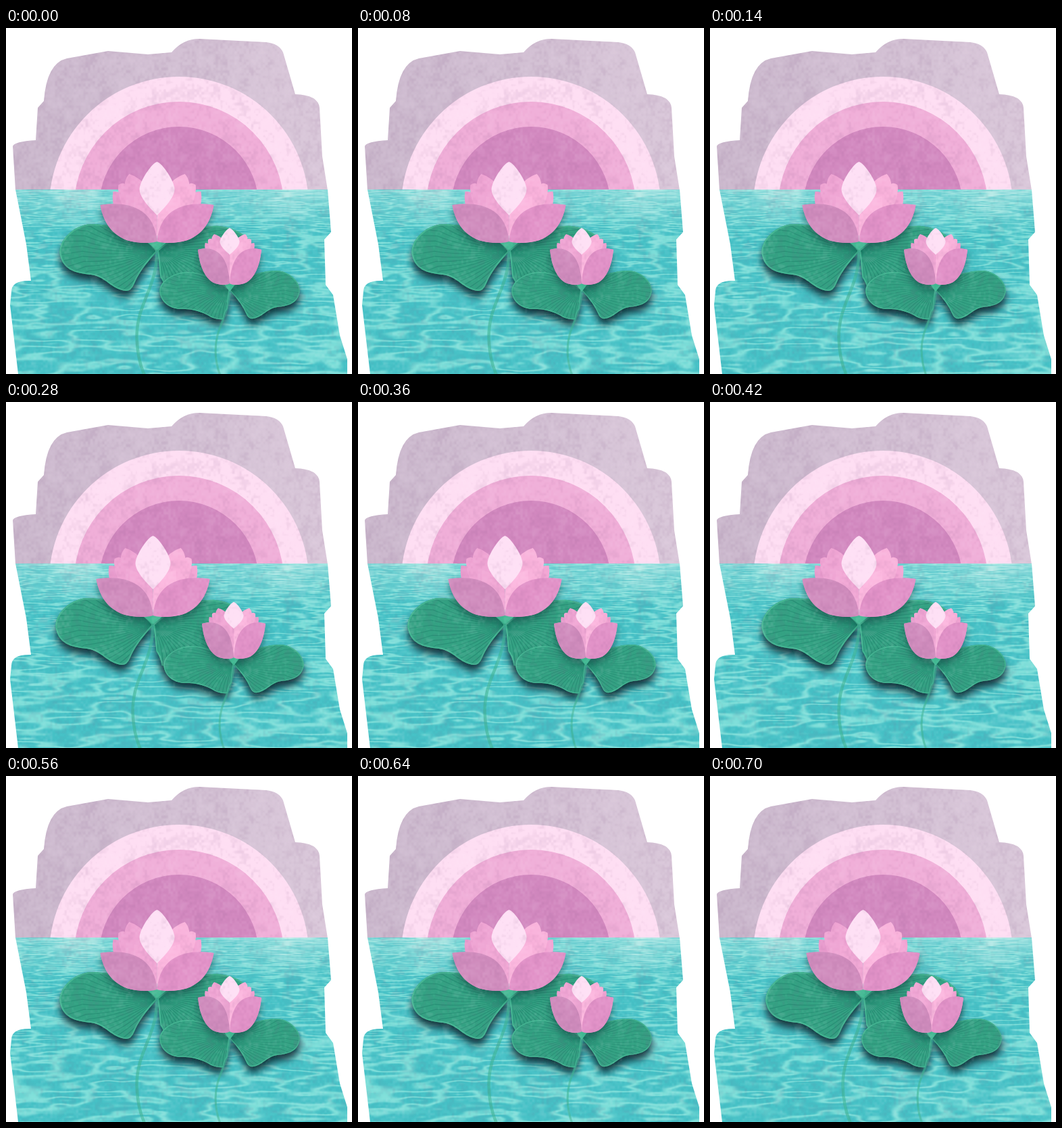
An HTML page with a canvas that plays this animation: 512 by 512 pixels, repeating every 0.84 s.

```html
<!DOCTYPE html>
<html lang="en">
<head>
<meta charset="utf-8">
<title>Lotus pond</title>
<style>
  html, body { margin: 0; height: 100%; overflow: hidden; background: #fff; }
  canvas { display: block; width: 512px; height: 512px; }
</style>
</head>
<body>
<canvas id="stage" width="512" height="512"></canvas>
<script>
const SIZE = 512, HORIZON = 239, STEP_MS = 140, STEPS = 6;
const start = performance.now();
const ctx = document.getElementById('stage').getContext('2d');

// Triangle wave in hard steps; the two plants drift in opposite directions.
const sway = step => 3 * Math.abs(step - 2) - 6;

// ---- Noise ----
function hash(x, y) {
  let h = Math.imul(x, 374761393) + Math.imul(y, 668265263);
  h = Math.imul(h ^ (h >>> 13), 1274126177);
  return ((h ^ (h >>> 16)) >>> 0) / 4294967296;
}
const mix = (a, b, t) => a + (b - a) * t;
const ease = t => t * t * (3 - 2 * t);
function noise(x, y) {
  const i = Math.floor(x), j = Math.floor(y), u = ease(x - i), v = ease(y - j);
  return mix(mix(hash(i, j), hash(i + 1, j), u), mix(hash(i, j + 1), hash(i + 1, j + 1), u), v);
}

// Builds a bitmap layer; shade(x, y) returns [r, g, b, a].
function makeLayer(height, shade) {
  const layer = document.createElement('canvas');
  layer.width = SIZE;
  layer.height = height;
  const c = layer.getContext('2d'), image = c.createImageData(SIZE, height);
  for (let y = 0, i = 0; y < height; y++)
    for (let x = 0; x < SIZE; x++, i += 4) image.data.set(shade(x, y), i);
  c.putImageData(image, 0, 0);
  return layer;
}

const grunge = makeLayer(SIZE, (x, y) => {
  const d = noise(x / 13, y / 16) * .5 + noise(x / 3.5, y / 4 + 90) * .5 - .5;
  return d > 0 ? [255, 240, 250, d * 70] : [120, 75, 125, -d * 70];
});

const WATER_DARK = [69, 193, 198], WATER_LIGHT = [145, 233, 224], WATER_PALE = [188, 236, 232];
const bump = (x, center, width) => Math.exp(-(((x - center) / width) ** 2));

// Contour lines of drifting noise, squeezed towards the horizon.
function makeWater(step) {
  const angle = step / STEPS * 2 * Math.PI;
  const dx = Math.cos(angle) * .35, dy = Math.sin(angle) * .6;
  return makeLayer(SIZE - HORIZON, (x, d) => {
    const u = (x - 256) / (34 + d * .1) + 40, v = 32 * Math.log(2 + d * .05);
    const n = noise(u + dx, v + dy) * .75 + noise(u * 2.7 - dx, v * 1.6 + 70 - dy) * .25;
    const crest = ((Math.sin(n * 15) + 1) / 2) ** 1.8 * .75;
    const haze = Math.max(0, 1 - d / 62) * (.42 + .4 * (bump(x, 105, 38) + bump(x, 415, 38)));
    const pale = haze * (.55 + .9 * noise(x / 16, d / 2 + dy));
    return WATER_DARK.map((c, k) => mix(mix(c, WATER_LIGHT[k], crest), WATER_PALE[k], pale)).concat(255);
  });
}
const waters = Array.from({ length: STEPS }, (_, step) => makeWater(step));

// ---- Shapes ----
const skyPath = new Path2D(`M14 240 L10 175 Q12 168 44 166 L47 118 L56 108 Q60 52 90 45 L151 34 L210 39
  L245 36 Q262 16 286 16 L385 21 Q404 23 410 36 L428 98 Q462 99 464 118 L468 190 L476 240Z`);
const waterPath = new Path2D(`M14 239 L30 320 L37 374 Q8 373 8 390 L6 410 L18 512 H505 V490 L494 455
  L484 395 L473 380 L471 313 L481 302 L476 239Z`);

// Leaf lobes around the point where the stem joins.
const lobes = [
  new Path2D(`M0 0 C-20-24-60-39-98-39 C-125-37-146-14-144 5 C-140 28-122 34-98 36
    C-75 39-68 58-46 60 Q-38 60-34 50 Q-25 28-1 3Z`),
  new Path2D(`M0 0 C25-22 60-38 92-36 C122-33 145-14 144 4 C142 28 120 40 100 40
    C75 40 55 46 38 57 Q22 63 13 61 Q11 48 5 40 Q3 20 1 3Z`)
];

// Left halves of the flower, around the height of the front petal tips.
const petals = {
  outer: new Path2D('M-65-20 Q-45-20-30 0 L0 45 L-60 12 Q-68-4-65-20Z'),
  inner: new Path2D('M-41-46 Q-15-38 0 0 V45 L-45 15 Q-60-14-57-30 Q-50-34-48-31 Q-46-42-41-46Z'),
  fold: new Path2D('M-34-13 C-14-9 0 4 0 22 V53 L-36 25Z'),
  center: new Path2D('M0-64 C8-62 26-35 26-23 C25-10 11 4 0 15 C-11 4-25-10-26-23 C-26-35-8-62 0-64Z'),
  front: new Path2D('M-84 0 C-50-6-4 0 0 54 C-8 57-30 57-45 52 C-70 42-80 22-84 0Z'),
  base: new Path2D('M-17 53 H17 L0 67Z')
};

function at(x, y, sx, sy, paint) {
  ctx.save();
  ctx.translate(x, y);
  ctx.scale(sx, sy);
  paint();
  ctx.restore();
}

function castShadow(color, blur, drop) {
  ctx.shadowColor = color;
  ctx.shadowBlur = blur;
  ctx.shadowOffsetY = drop;
}

function flower(x, y, width, top, bottom) {
  const petal = (name, color, sx, sy) => at(x, y, sx, sy, () => {
    ctx.fillStyle = color;
    ctx.fill(petals[name]);
  });
  const pair = (name, left, right, sy) => {
    petal(name, left, width, sy);
    petal(name, right, -width, sy);
  };
  ctx.save();
  castShadow('rgba(15, 60, 60, .6)', 12, 6);
  pair('front', '#cf8abb', '#e08fc5', bottom);
  ctx.restore();
  petal('base', '#3fb891', width, bottom);
  pair('outer', '#e89bcd', '#f3a5d4', top);
  pair('inner', '#efa4d3', '#f9b2db', top);
  pair('fold', '#f2a9d6', '#fcb8df', bottom);
  petal('center', '#fee0f5', width, top);
  pair('front', '#d08cbd', '#e292c8', bottom);
}

function lobe(path) {
  ctx.save();
  castShadow('rgba(12, 42, 50, .95)', 12, 9);
  ctx.fillStyle = '#33a283';
  ctx.fill(path);
  ctx.restore();

  ctx.save();
  ctx.clip(path);
  ctx.strokeStyle = 'rgba(24, 122, 100, .45)';
  ctx.lineWidth = 1.6;
  for (let i = 0; i < 64; i++) {
    ctx.save();
    ctx.scale(1, .7);
    ctx.rotate(i / 64 * 2 * Math.PI);
    ctx.beginPath();
    ctx.bezierCurveTo(0, 0, 60, -9, 110, 9);
    ctx.lineTo(180, 0);
    ctx.stroke();
    ctx.restore();
  }
  ctx.strokeStyle = '#43b692';
  ctx.lineWidth = 4;
  ctx.stroke(path);
  ctx.restore();
}

function stem() {
  ctx.strokeStyle = 'rgba(62, 181, 149, .6)';
  ctx.lineWidth = 4.5;
  ctx.stroke(new Path2D('M0 0 C0 57-30 77-30 129 Q-29 165-16 190'));
}

function drawSky() {
  const sky = ctx.createLinearGradient(10, 0, 470, 0);
  sky.addColorStop(0, '#cab7cc');
  sky.addColorStop(1, '#d9c7d9');
  ctx.save();
  ctx.clip(skyPath);
  ctx.fillStyle = sky;
  ctx.fillRect(0, 0, SIZE, HORIZON + 1);
  ['#fedef3', '#f0aed8', '#d288bf'].forEach((color, i) => {
    ctx.fillStyle = color;
    ctx.beginPath();
    ctx.arc(256, 264, 192 - 37 * i, 0, 2 * Math.PI);
    ctx.fill();
  });
  ctx.restore();
}

function draw(step) {
  const dx = sway(step), big = 223.5 + dx, small = 331 - dx;
  ctx.clearRect(0, 0, SIZE, SIZE);
  drawSky();

  ctx.save();
  ctx.clip(waterPath);
  ctx.drawImage(waters[step], 0, HORIZON);
  at(big, 329, 1, 1, () => { lobes.forEach(lobe); stem(); });
  flower(big, 262, 1, 1, 1);
  // The small leaf is the big one mirrored.
  at(small, 387, -.72, .72, () => lobes.forEach(lobe));
  at(small, 387, .7, .7, stem);
  ctx.restore();

  flower(small, 328, .56, .5, .93);
  // Petals of the big flower rise above the waterline, in front of the sun.
  ctx.save();
  ctx.beginPath();
  ctx.rect(0, 0, SIZE, HORIZON);
  ctx.clip();
  flower(big, 262, 1, 1, 1);
  ctx.restore();

  ctx.globalCompositeOperation = 'source-atop';
  ctx.drawImage(grunge, 0, 0);
  ctx.globalCompositeOperation = 'source-over';
}

let shown = -1;
function tick() {
  const step = Math.floor((performance.now() - start) / STEP_MS) % STEPS;
  if (step !== shown) draw(shown = step);
  requestAnimationFrame(tick);
}
tick();
</script>
</body>
</html>
```
